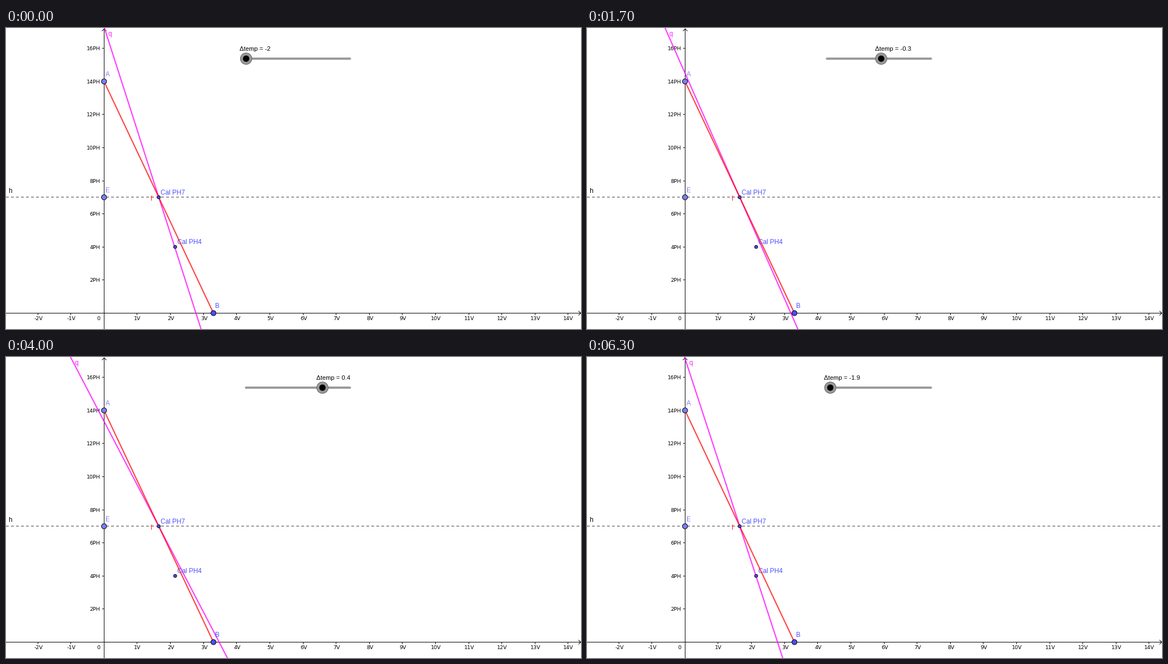
Recreate the animation shown at these times as a matplotlib script. Size 1034 by 542 pixels, loop 6400 ms.

```python
import matplotlib.pyplot as plt
from matplotlib.animation import FuncAnimation
from matplotlib.patches import Circle

W, H, DPI = 1034, 542, 100
PX = 72 / DPI                      # points per pixel
X0, Y0 = 176.3, 513.4              # origin of the graph on the stage
UX, UY = 59.62, 29.8               # pixels per volt and per PH
SLIDER_Y = 55.2
BLUE, PALE_BLUE = "#4d4dff", "#7d7dff"
FRAMES, INTERVAL = 64, 100

plt.rcParams["font.family"] = "Liberation Sans"
fig = plt.figure(figsize=(W / DPI, H / DPI), dpi=DPI, facecolor="white")
ax = fig.add_axes([0, 0, 1, 1])
ax.set_xlim(0, W)
ax.set_ylim(H, 0)
ax.axis("off")


def to_stage(volt, ph):
    return X0 + volt * UX, Y0 - ph * UY


def pixel_center(v):
    return int(v) + 0.5


def stroke(xs, ys, color="black", width=1.0, z=1, **kw):
    kw.setdefault("solid_capstyle", "butt")
    return ax.plot(xs, ys, color=color, lw=width * PX, zorder=z, snap=False,
                   **kw)[0]


def label(x, y, text, color="black", size=11.7, z=6, **kw):
    return ax.text(x, y, text, color=color, fontsize=size * PX, zorder=z,
                   va="baseline", **kw)


def dot(center, radius, fill, edge="black", z=5):
    return ax.add_patch(Circle(center, radius, facecolor=fill, edgecolor=edge,
                               lw=PX, zorder=z))


def draw_axes():
    cx, cy = pixel_center(X0), pixel_center(Y0)
    stroke([0, W], [cy, cy])
    stroke([cx, cx], [1, H])
    stroke([W - 4.5, W - 0.5, W - 4.5], [cy - 4, cy, cy + 4])
    stroke([cx - 4, cx, cx + 4], [5.5, 1.5, 5.5])
    tick = dict(size=9.5, family="DejaVu Sans", z=2)
    for volt in range(-2, 15):
        x = pixel_center(to_stage(volt, 0)[0])
        if volt:
            stroke([x, x], [cy, cy + 3.5])
            label(x + 1, 526, f"{volt}V", ha="center", **tick)
    for ph in range(2, 17, 2):
        y = pixel_center(to_stage(0, ph)[1])
        stroke([cx - 3.5, cx], [y, y])
        label(169.5, y + 3.5, f"{ph}PH", ha="right", **tick)
    label(169, 526, "0", ha="right", **tick)


def draw_fixed_objects():
    a, b, e = to_stage(0, 14), to_stage(3.3, 0), to_stage(0, 7)
    row = pixel_center(e[1])
    stroke([0, W], [row, row], "#404040", z=2, dashes=(5, 4),
           dash_capstyle="butt")
    stroke([a[0], b[0]], [a[1], b[1]], "#ff0000", 2.2, z=4, alpha=0.72)

    dot(a, 4.6, PALE_BLUE)
    dot(e, 4.6, PALE_BLUE)
    dot(b, 4.6, BLUE)
    dot(to_stage(1.65, 7), 2.8, BLUE)
    dot(to_stage(2.145, 4), 2.8, BLUE)

    label(179, 87, "A", PALE_BLUE)
    label(179, 296, "E", PALE_BLUE)
    label(376, 504, "B", BLUE)
    label(278, 300, "Cal PH7", BLUE)
    label(308, 389, "Cal PH4", BLUE)
    label(260, 311, "f", "#ff2020")
    label(4, 297, "h")
    stroke([431.5, 618.5], [SLIDER_Y, SLIDER_Y], "#999999", 4, z=7,
           solid_capstyle="round")


draw_axes()
draw_fixed_objects()
q_line = stroke([], [], "#ff00ff", 2.2, z=3, alpha=0.75)
q_label = label(0, 14, "q", "#ff22ff")
knob = dot((0, SLIDER_Y), 10.3, "#999999", "#666666", z=8)
knob_core = dot((0, SLIDER_Y), 5.2, "black", z=9)
temp_label = label(0, 41, "", size=11.2)


def update(n):
    temp = (12 - abs(32 - n)) / 10
    slope = -14 / 3.3 + temp
    px, py = to_stage(1.65, 7)

    def q_at(y):
        return px + (py - y) / UY / slope * UX

    q_line.set_data([q_at(-10), q_at(H + 10)], [-10, H + 10])
    q_label.set_x(round(q_at(0) + 7.5))

    knob_x = 431.8 + 57.2 * (temp + 2)
    knob.center = knob_core.center = (knob_x, SLIDER_Y)
    temp_label.set_x(round(knob_x - 11.3))
    temp_label.set_text(f"Δtemp = {temp:g}")
    return q_line, q_label, knob, knob_core, temp_label


anim = FuncAnimation(fig, update, frames=FRAMES, interval=INTERVAL,
                     repeat=True, repeat_delay=0)
plt.show()
```
